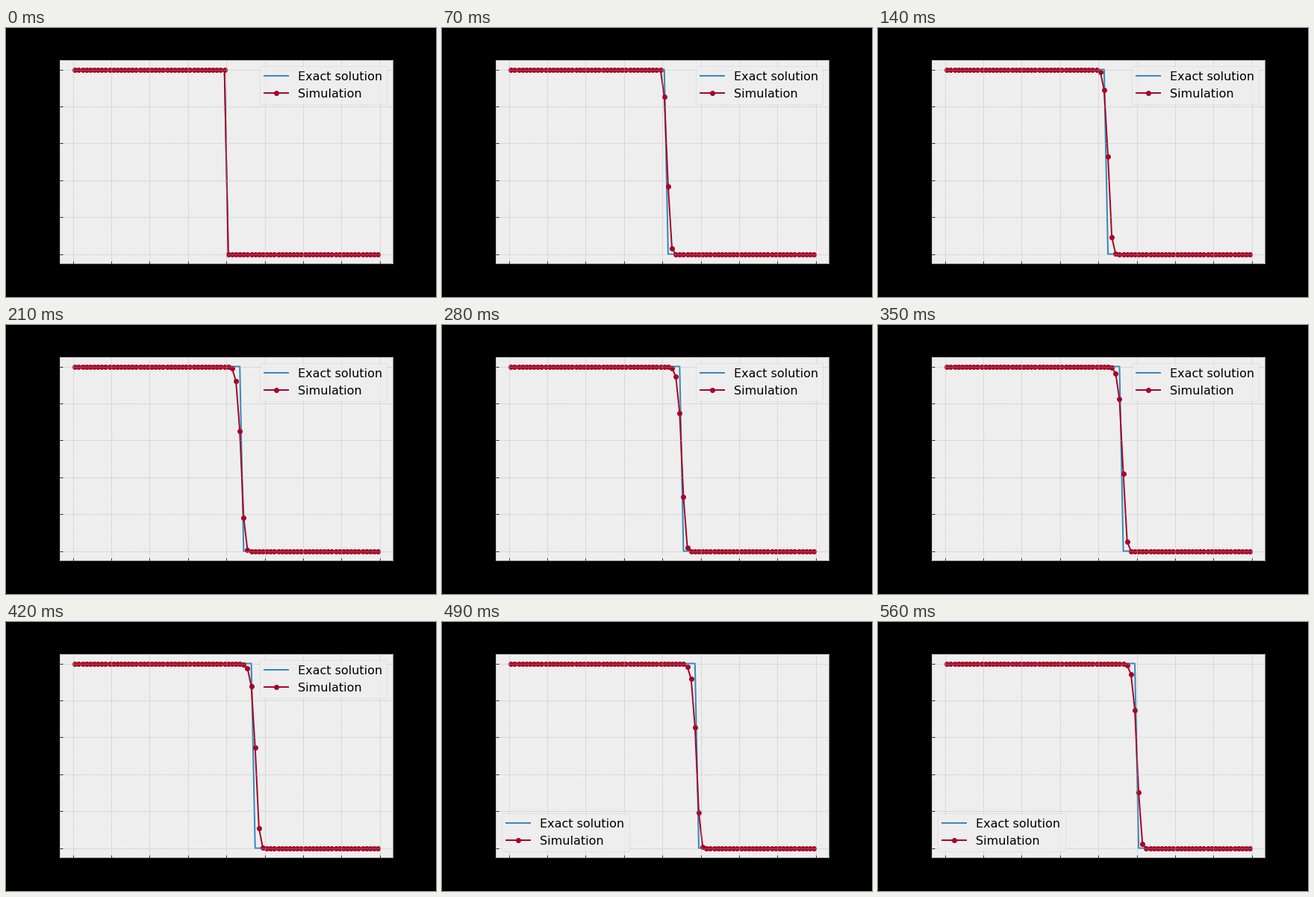
A matplotlib script for the animation above (630 ms loop, 576x360 px).

```python
import numpy as np
import matplotlib.pyplot as plt
from matplotlib.animation import FuncAnimation

plt.rcParams.update({
    "font.family": "DejaVu Sans",
    "lines.linewidth": 2.0,
    "patch.linewidth": 0.5,
    "axes.facecolor": "#eeeeee",
    "axes.edgecolor": "#bcbcbc",
    "axes.axisbelow": False,
    "axes.grid": True,
    "grid.color": "#b2b2b2",
    "grid.linestyle": "--",
    "grid.linewidth": 0.5,
    "xtick.direction": "in",
    "ytick.direction": "in",
    "savefig.facecolor": "black",
})

FRAMES, INTERVAL = 9, 70
CELLS = 80
DX = 2 / CELLS
FRAME_TIME = 2.5 * DX
SUBSTEPS = 50

x = (np.arange(CELLS) + 0.5) * DX


def exact(t):
    """Shock starting at x = 1 and moving at speed 1/2."""
    return np.where(x < 1 + 0.5 * t - 1e-9, 1.0, 0.0)


def simulate():
    """Upwind finite volumes for the inviscid Burgers equation."""
    u = exact(0)
    states = [u.copy()]
    ratio = FRAME_TIME / SUBSTEPS / DX
    for _ in range(FRAMES - 1):
        for _ in range(SUBSTEPS):
            flux = 0.5 * np.concatenate(([1.0], u)) ** 2
            u = u - ratio * np.diff(flux)
        states.append(u.copy())
    return states


states = simulate()

fig = plt.figure(figsize=(8, 5), dpi=72, facecolor="black")
fig.subplots_adjust(left=0.125, right=0.9, bottom=0.125, top=0.88)
ax = fig.add_subplot()
exact_line, = ax.plot(x, exact(0), color="#348ABD", label="Exact solution")
sim_line, = ax.plot(x, states[0], "o-", color="#A60628", label="Simulation")
ax.set_xticks(np.linspace(0, 2, 9))
ax.set_yticks(np.linspace(0, 1, 6))
ax.tick_params(labelbottom=False, labelleft=False)
ax.legend(loc="best", fontsize=16)


def update(k):
    exact_line.set_ydata(exact(k * FRAME_TIME))
    sim_line.set_ydata(states[k])
    return exact_line, sim_line


anim = FuncAnimation(fig, update, frames=FRAMES, interval=INTERVAL,
                     init_func=lambda: update(0), repeat=True, repeat_delay=0)
plt.show()
```
